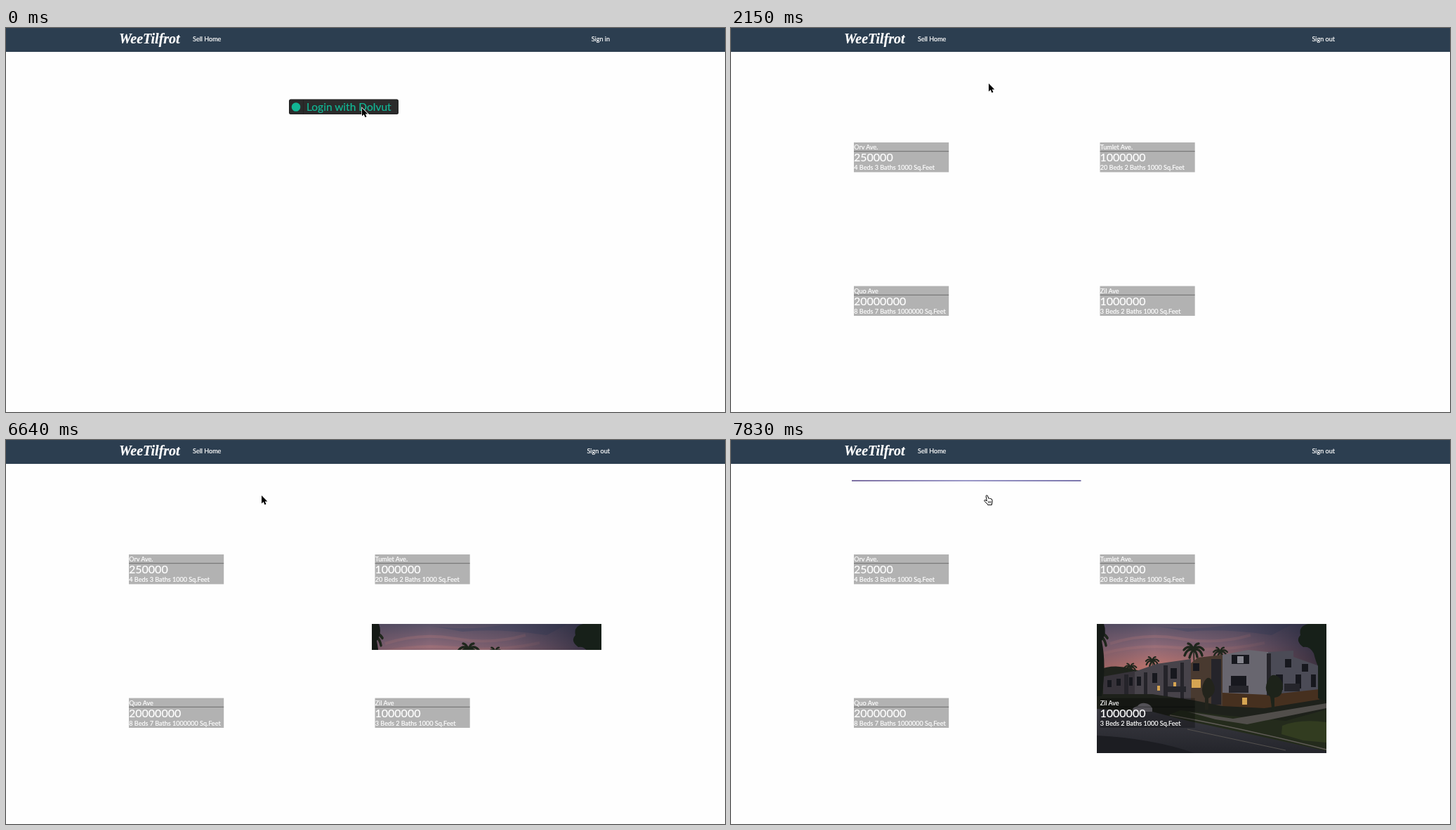
These frames come from a looping animation (1024 px wide and 547 px high, 8000 ms). An HTML page:

```html
<!DOCTYPE html>
<html lang="en">
<head>
<meta charset="utf-8">
<title>Home listings</title>
<style>
html, body { margin: 0; width: 100%; height: 100%; overflow: hidden; background: #fefefe; }
svg { position: absolute; left: 0; top: 0; display: block; }
text { font: 9.05px Lato, sans-serif; fill: #fff; stroke: #fff; stroke-width: .2px; }
#brand { font: italic bold 20px "Liberation Serif", serif; }
.end { text-anchor: end; }
.price { font-size: 16px; }

#login, #listings, #button, #label, #arrow, #hand, #strip, #photo {
  animation: 8s step-end infinite;
}
#login { animation-name: login; }
#listings { animation-name: listings; }
#button { animation-name: button; }
#label { font-size: 15.5px; fill: #12b795; stroke: #12b795; animation-name: label; }
#arrow { animation-name: arrow; }
#hand { animation-name: hand; }
#strip { animation-name: strip; }
#photo {
  position: absolute; left: 521px; top: 262px; width: 327px; height: 0;
  overflow: hidden; animation-name: photo;
}

@keyframes login { 0% { visibility: visible } 26.875%, 100% { visibility: hidden } }
@keyframes listings { 0% { visibility: hidden } 26.875%, 100% { visibility: visible } }
@keyframes strip { 0% { visibility: hidden } 92.25%, 100% { visibility: visible } }
@keyframes button {
  0% { fill: #2b2b2b }
  1.875% { fill: #191919 }
  4.5% { fill: #2b2b2b }
  11.875%, 100% { fill: #444 }
}
@keyframes label {
  0% { text-decoration: none }
  1.875%, 100% { text-decoration: underline }
}
@keyframes arrow {
  0% { transform: translate(507px, 114px); visibility: visible }
  8.125% { transform: translate(490px, 119px); visibility: hidden }
  10% { transform: translate(373px, 86px); visibility: visible }
  11.875% { transform: translate(367px, 79px); visibility: visible }
  32.5% { transform: translate(364px, 79px); visibility: visible }
  90.375%, 100% { transform: translate(364px, 79px); visibility: hidden }
}
@keyframes hand {
  0% { transform: translate(489px, 118px); visibility: hidden }
  8.125% { transform: translate(489px, 118px); visibility: visible }
  10% { transform: translate(360px, 78px); visibility: hidden }
  90.375%, 100% { transform: translate(360px, 78px); visibility: visible }
}
@keyframes photo {
  0% { height: 0 }
  83% { height: 36.5px }
  84.875% { height: 59px }
  97.875%, 100% { height: 184px }
}
</style>
</head>
<body>
<div id="photo">
<svg width="327" height="184" viewBox="521 262 327 184">
  <defs>
    <linearGradient id="sky" x2="0" y2="1">
      <stop offset="0" stop-color="#5a5368"/>
      <stop offset=".4" stop-color="#8a6877"/>
      <stop offset=".8" stop-color="#bb746e"/>
      <stop offset="1" stop-color="#b97468"/>
    </linearGradient>
    <linearGradient id="dusk">
      <stop offset="0" stop-color="#3d3448" stop-opacity=".3"/>
      <stop offset=".25" stop-color="#25283e" stop-opacity="0"/>
      <stop offset=".6" stop-color="#25283e" stop-opacity=".25"/>
      <stop offset="1" stop-color="#1c2034" stop-opacity=".85"/>
    </linearGradient>
    <linearGradient id="road" x2="0" y2="1">
      <stop offset="0" stop-color="#3b3b43"/>
      <stop offset="1" stop-color="#24252b"/>
    </linearGradient>
    <g id="palm" fill="none" stroke="#1f261c" stroke-linecap="round">
      <path stroke-width="1.5" d="M0 0Q1 20 0 42"/>
      <path stroke-width="3.4" d="M0 0Q-7-8-14 0M0 0Q-9-3-13 8M0 0Q-4-9-8-9M0 0Q2-9 7-9M0 0Q7-8 14 0M0 0Q9-3 12 8M0 0Q-4 3-6 11M0 0Q4 3 5 10"/>
    </g>
  </defs>
  <rect x="521" y="262" width="327" height="184" fill="#1d2219"/>
  <rect x="521" y="262" width="327" height="75" fill="url(#sky)"/>
  <g fill="none" stroke="#c47f7e" stroke-opacity=".25" stroke-width="4">
    <path d="M540 290Q590 274 640 283T740 278"/>
    <path d="M530 304Q580 290 640 296T760 289"/>
  </g>
  <path d="M590 262Q650 274 710 263L800 262 770 278Q700 268 650 273Z" fill="#494b66" opacity=".5"/>
  <rect x="521" y="262" width="327" height="75" fill="url(#dusk)"/>

  <path d="M521 328Q545 318 570 326T620 322V366H521Z" fill="#20231d"/>
  <use href="#palm" transform="translate(659 299)"/>
  <use href="#palm" transform="translate(697 302) scale(.7)"/>
  <use href="#palm" transform="translate(600 315) scale(.65)"/>
  <use href="#palm" transform="translate(569 324) scale(.6)"/>
  <use href="#palm" transform="translate(522 282) scale(1 1.3)"/>

  <path d="M530 337L575 329V366H530Z" fill="#37333a"/>
  <path d="M575 330L606 319 655 312V374L575 366Z" fill="#47434a"/>
  <path d="M655 318L665 310 700 306V380L655 374Z" fill="#493a30"/>
  <path d="M700 306L737 299 765 302V366H700Z" fill="#68666f"/>
  <path d="M765 302L801 300V309L838 322V358L765 366Z" fill="#4b4b56"/>
  <path d="M700 360L765 363 838 355V378L745 390 700 382Z" fill="#46301f"/>
  <path d="M684 312H698V377H684ZM763 304H769V364H763ZM560 334H566V364H560ZM588 331H593V366H588ZM616 321H622V368H616ZM640 317H645V372H640Z" fill="#25242a"/>
  <g fill="#17181e">
    <path d="M713 306H738V319H713ZM658 318H667V329H658ZM789 312H798V324H789ZM813 319H822V330H813Z"/>
    <path d="M712 336H734V358H712ZM776 334H786V356H776ZM804 334H812V354H804ZM826 334H833V352H826Z"/>
    <path d="M536 342H542V352H536ZM549 340H555V350H549ZM567 338H572V350H567ZM578 337H584V350H578ZM600 332H607V346H600ZM626 325H635V340H626Z"/>
  </g>
  <path d="M721 308H730V318H721Z" fill="#85858d"/>
  <path d="M656 341H669V353H656ZM630 345H634V352H630ZM728 367H735V377H728ZM607 350H611V357H607Z" fill="#d6a552"/>
  <path d="M709 350H737V360H709ZM788 347H810V358H788ZM622 351H648V359H622Z" fill="#25252b"/>
  <path d="M521 362H600L660 371 700 379 760 382 848 368V388L745 400 521 386Z" fill="#1e211b"/>
  <path d="M771 388L768 366Q758 356 764 344 769 330 779 337 789 345 785 357 784 366 774 367V388Z" fill="#1d231a"/>
  <path d="M675 384V368Q667 356 674 344 681 332 687 347 693 360 680 368V384Z" fill="#23241c"/>

  <path d="M640 385L700 392 790 400 848 384V443L720 420 620 393Z" fill="#242b1c"/>
  <path d="M521 383L600 387 650 400 725 416 848 443V446H521Z" fill="url(#road)"/>
  <path d="M521 421Q600 425 660 446H521Z" fill="#1c1d22"/>
  <path d="M650 387L715 397 848 375V382L735 405 690 398Z" fill="#514e4b"/>
  <path d="M625 392Q725 410 848 441" fill="none" stroke="#605c57" stroke-width="1.5"/>
  <path d="M650 412L790 442" stroke="#55524f"/>
  <path d="M785 407Q810 397 848 402V431L815 428 784 419Z" fill="#323c20"/>
  <path d="M572 383Q574 380 579 379 583 374 590 375 597 376 600 382V387H573Z" fill="#77747c"/>
  <path d="M521 262H531Q536 275 528 286 535 320 528 365H521Z" fill="#151a16"/>
  <path d="M848 262H822Q808 265 811 278 803 286 815 295 824 293 830 304 833 316 836 322V368L848 372Z" fill="#172019"/>
</svg>
</div>

<svg width="1024" height="547" viewBox="0 0 1024 547">
  <defs>
    <linearGradient id="edge">
      <stop offset="0" stop-color="#7d70a2"/>
      <stop offset=".5" stop-color="#9a98c8"/>
      <stop offset="1" stop-color="#7b76ac"/>
    </linearGradient>
    <g id="plate">
      <rect width="135.2" height="42.4" fill="#000" fill-opacity=".3"/>
      <rect y="12.2" width="135.2" height="1" fill="#000" fill-opacity=".4"/>
    </g>
  </defs>

  <rect width="1024" height="34" fill="#2c3e50"/>
  <text id="brand" x="161" y="21.5">WeeTilfrot</text>
  <text x="266" y="19">Sell Home</text>

  <g id="login">
    <text class="end" x="860" y="19">Sign in</text>
    <rect id="button" x="403" y="101.5" width="156" height="21.5" rx="2.5"/>
    <rect x="403.5" y="102" width="155" height="20.5" rx="2.2" fill="none" stroke="#000" stroke-opacity=".25"/>
    <path d="M423.5 102V123" stroke="#000" stroke-opacity=".2"/>
    <circle cx="413" cy="112.5" r="6.3" fill="#12b795"/>
    <text id="label" x="424" y="118">&nbsp;Login with Dolvut</text>
  </g>

  <g id="listings">
    <text class="end" x="860" y="19">Sign out</text>
    <g transform="translate(175 163)">
      <use href="#plate"/>
      <text x=".3" y="10">Orv Ave.</text>
      <text class="price" y="27">250000</text>
      <text x=".3" y="39">4 Beds 3 Baths 1000 Sq.Feet</text>
    </g>
    <g transform="translate(525.5 163)">
      <use href="#plate"/>
      <text x=".3" y="10">Tumlet Ave.</text>
      <text class="price" y="27">1000000</text>
      <text x=".3" y="39">20 Beds 2 Baths 1000 Sq.Feet</text>
    </g>
    <g transform="translate(175 367.6)">
      <use href="#plate"/>
      <text x=".3" y="10">Quo Ave</text>
      <text class="price" y="27">20000000</text>
      <text x=".3" y="39">8 Beds 7 Baths 1000000 Sq.Feet</text>
    </g>
    <g transform="translate(525.5 367.6)">
      <use href="#plate"/>
      <text x=".3" y="10">Zil Ave</text>
      <text class="price" y="27">1000000</text>
      <text x=".3" y="39">3 Beds 2 Baths 1000 Sq.Feet</text>
    </g>
  </g>

  <rect id="strip" x="172" y="57" width="326.5" height="2" fill="url(#edge)"/>

  <path id="arrow" d="M0 0V11.6L2.7 9.1 4.5 13.2 6.5 12.3 4.7 8.4H8.3Z" stroke="#fff" stroke-width="1.4" paint-order="stroke"/>
  <g id="hand" stroke="#000" stroke-linejoin="round">
    <path d="M3.2 2.2Q3 .8 4.3.8 5.4.8 5.7 2L6.6 5.2Q7.5 4.6 8.3 5.4 9.3 5 10 5.9 11.6 5.6 11.9 7.2L12.2 10.5Q12 12 11.4 13V14.4H5.6L5.2 13.2 1.2 9.4Q.3 8.3 1.1 7.7 2 7.2 3 8L4.3 9Z" fill="#fff"/>
    <path d="M6.6 9V12M8.4 9V12M10.2 9V12" stroke-width=".7"/>
  </g>
</svg>
</body>
</html>
```
